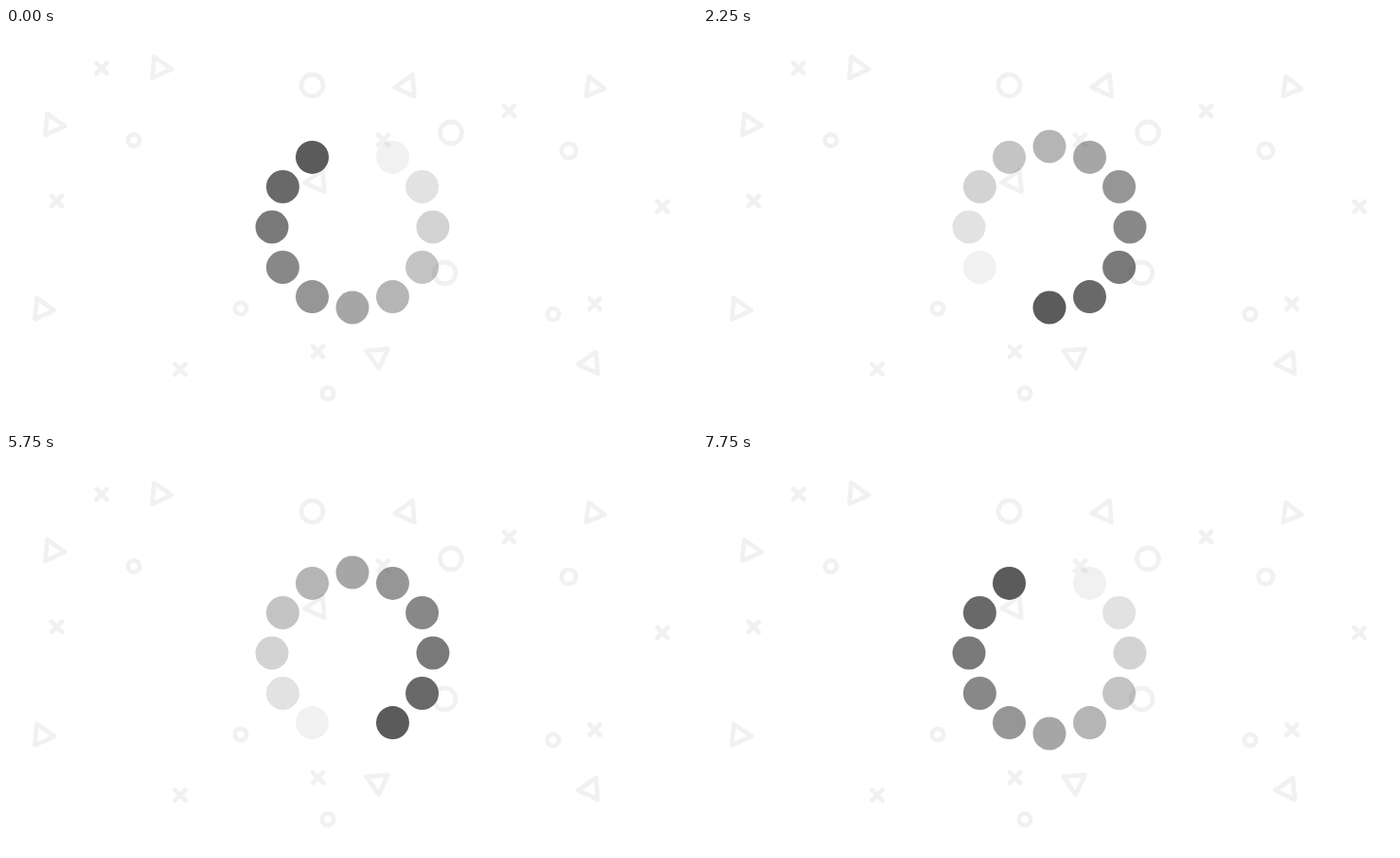
Animation of 730 by 420 pixels, one loop 8 s. Source, as an HTML page:

```html
<!DOCTYPE html>
<html>
<head>
<meta charset="utf-8">
<style>
  html, body { margin: 0; height: 100%; overflow: hidden; background: #fff; }
  svg { display: block; }
  #pattern { fill: none; stroke: #f1f1f1; stroke-width: 4.8; stroke-linecap: round; stroke-linejoin: round; }
  #dots { fill: #5b5b5b; }
</style>
</head>
<body>
<svg width="730" height="420" viewBox="0 0 730 420">
  <path id="pattern"/>
  <g id="dots"></g>
</svg>
<script>
const COUNT = 12, TICK = 250, LOOP = 8000, FADE = 0.0915;
const pattern = document.getElementById('pattern');
const dotLayer = document.getElementById('dots');

const polar = (x, y, radius, degrees) => {
  const angle = degrees * Math.PI / 180;
  return [x + radius * Math.cos(angle), y + radius * Math.sin(angle)];
};

const cross = () => (x, y) => `M${x - 5.5} ${y - 5.5}l11 11m0-11l-11 11`;
const ring = r => (x, y) => `M${x - r} ${y}a${r} ${r} 0 1 0 ${2 * r} 0a${r} ${r} 0 1 0 ${-2 * r} 0z`;
const triangle = (radius, tilt) => (x, y) =>
  `M${[0, 120, 240].map(turn => polar(x, y, radius, tilt + turn)).join('L')}z`;

const scatter = (shape, ...places) => places.map(([x, y]) => shape(x, y)).join('');

pattern.setAttribute('d',
  scatter(cross(), [101, 42.5], [53.5, 182.5], [398.5, 118], [531.5, 87.5],
    [693.5, 188.5], [622, 291], [329.5, 341.5], [184, 360]) +
  scatter(ring(6.2), [135, 118.5], [248, 296], [578, 302], [340, 385.5]) +
  scatter(ring(7.7), [594.5, 129.5]) +
  scatter(ring(11.5), [323.5, 60.5], [470, 110.5], [463.5, 258.5]) +
  scatter(triangle(13, 5), [162, 42.2], [49, 102.2], [38, 296.7]) +
  scatter(triangle(13.2, 175), [423.9, 61.3], [328.8, 162], [617.6, 353.8]) +
  scatter(triangle(13.2, 85), [392.7, 346.3]) +
  scatter(triangle(12, 8), [620.3, 62.3]));

const dots = Array.from({ length: COUNT }, (_, i) => {
  const [x, y] = polar(366, 210, 85, i * 360 / COUNT - 90);
  const dot = document.createElementNS('http://www.w3.org/2000/svg', 'circle');
  dot.setAttribute('cx', x);
  dot.setAttribute('cy', y);
  dot.setAttribute('r', 17.5);
  return dotLayer.appendChild(dot);
});

// The head moves on 4 of 5 ticks, later on 3 of 4.
const stepsAt = tick => Math.floor(Math.min((4 * tick + 2) / 5, (3 * tick + 5) / 4));

const start = performance.now();

function draw() {
  const tick = Math.floor((performance.now() - start) % LOOP / TICK);
  const head = stepsAt(tick) + COUNT - 1;
  dots.forEach((dot, i) => {
    const age = (head - i + COUNT) % COUNT;
    dot.setAttribute('opacity', Math.max(0, 1 - age * FADE));
  });
  requestAnimationFrame(draw);
}
draw();
</script>
</body>
</html>
```
